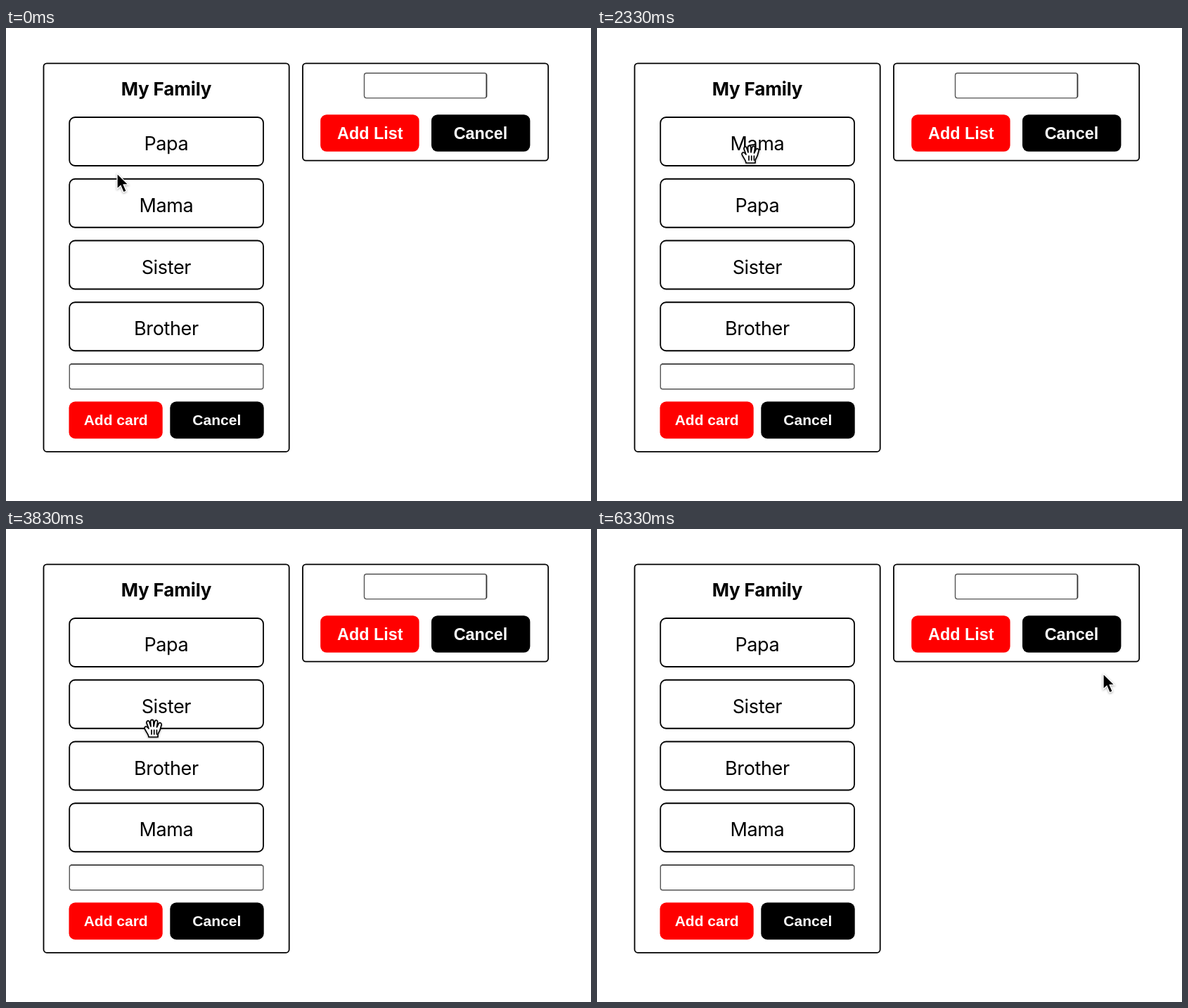
An HTML page that plays this animation: 832 by 673 pixels, repeating every 6.49 s.

```html
<!DOCTYPE html>
<html lang="en">
<head>
<meta charset="utf-8">
<title>Card board</title>
<style>
  html, body { margin: 0; width: 100%; height: 100%; overflow: hidden; background: #fff; }
  svg { display: block; }
  text { text-anchor: middle; }
  .line { fill: none; stroke: #000; stroke-width: 1.8; }
  .field { fill: none; stroke: #555; stroke-width: 1.4; }
  .title { font: 700 26px Inter, sans-serif; letter-spacing: -.15px; }
  .card text { font: 27px Inter, sans-serif; letter-spacing: -.35px; }
  .button { font: 700 21px "Liberation Sans", Arial, sans-serif; fill: #fff; }
  .big { font-size: 23.4px; }
  .hand { fill: #fff; stroke: #000; stroke-width: 1.7; stroke-linejoin: round; stroke-linecap: round; }
  #cursor { filter: drop-shadow(0 1.5px 1.5px rgba(0, 0, 0, .35)); }
</style>
</head>
<body>
<svg width="832" height="673" viewBox="0 0 832 673">
  <rect class="line" x="53.5" y="50.4" width="349.2" height="552.4" rx="4.5"/>
  <text class="title" x="228" y="95.5">My Family</text>
  <rect class="field" x="90.3" y="478.2" width="275.6" height="35.6" rx="3"/>
  <path d="M92 478.2H364" stroke="#333" stroke-width="1.6"/>
  <rect x="89.5" y="531.6" width="133.2" height="52.6" rx="8.8" fill="red"/>
  <rect x="233.3" y="531.6" width="133.4" height="52.6" rx="8.8"/>
  <text class="button" x="156.2" y="565.4">Add card</text>
  <text class="button" x="299.8" y="565.4">Cancel</text>

  <rect class="line" x="422" y="50.4" width="349.2" height="138.2" rx="4.5"/>
  <rect class="field" x="509.5" y="64.2" width="174" height="35.4" rx="3"/>
  <path d="M683.4 66V98" stroke="#333" stroke-width="1.6"/>
  <rect x="447.2" y="123.2" width="140.4" height="52.6" rx="8.8" fill="red"/>
  <rect x="605" y="123.2" width="140.4" height="52.6" rx="8.8"/>
  <text class="button big" x="517.8" y="158">Add List</text>
  <text class="button big" x="675" y="158">Cancel</text>

  <g id="cards"></g>
  <g id="cursor">
    <path id="arrow" d="M0 0V22l5-4.6 4 9.4 4.2-1.8-4-9.2h6.8z" stroke="#fff" stroke-width="1.3"/>
    <g id="open" class="hand">
      <path d="M-6 12C-6 8-12 2-12-1C-11-4-8-3-6 0L-9-8C-9-12-5.5-12-5-9L-3-3L-3.5-10C-3-13.5 .5-13.5 .8-10L1-3L2.5-10C4-13 7-12 6.5-8.5L5.5-2L8-7C10-9.5 12.5-8 12-5C11 0 9.5 4 7 8V12Z"/>
      <path d="M-2 2v6M1.7 2v6M5.4 2v6"/>
    </g>
    <g id="closed" class="hand">
      <path d="M-5 10C-5 7-10 3-10 0C-10-3-7-3-6-2V-6C-5-9-2-9-1-7C0-9.5 3-9.5 4-7C5-8.5 8-8 8-5.5C10-6 10.5-4 10.5-2C10.5 3 7 6 7 10Z"/>
      <path d="M-2 0v6M1.7 0v6M5.4 0v6"/>
    </g>
    <g id="beam" fill="none" stroke-linecap="round">
      <path id="stem" d="M-5-12Q0-12 0-8Q0-12 5-12M0-8V8M-5 12Q0 12 0 8Q0 12 5 12M-2.5 2H2.5" stroke="#fff" stroke-width="4"/>
      <use href="#stem"/>
      <path d="M-5-12Q0-12 0-8Q0-12 5-12M0-8V8M-5 12Q0 12 0 8Q0 12 5 12M-2.5 2H2.5" stroke="#000" stroke-width="1.8"/>
    </g>
  </g>
</svg>
<script>
const LOOP = 6490, LEFT = 90.2, TOP = 127, PITCH = 87.75;
const $ = id => document.getElementById(id);

// Pointer path: [step, x, y, shape]
const pointer = [
  [0, 158, 207, 'arrow'], [1, 157, 171, 'open'], [2, 490, 534, 'arrow'], [3, 490, 534, 'arrow'],
  [4, 546, 430, 'arrow'], [5, 380, 270, 'arrow'], [6, 210, 179, 'open'], [7, 210, 179, 'closed'],
  [8, 208, 205, 'closed'], [10, 204.5, 283, 'closed'], [11, 204.5, 283, 'open'], [14, 218, 180, 'open'],
  [15, 217, 183, 'closed'], [17, 198, 440, 'closed'], [18, 197.5, 486, 'beam'], [19, 198, 500, 'beam'],
  [20, 200, 490, 'beam'], [21, 203, 432, 'open'], [23, 209, 284, 'open'], [24, 220, 265, 'open'],
  [25, 228, 266, 'closed'], [26, 400, 275, 'closed'], [28, 826, 293, 'closed'], [32, 826, 293, 'closed'],
  [33, 817, 289, 'arrow'], [37, 817, 289, 'arrow'], [38, 720, 206, 'arrow']
];

// slots: [step, slot]; drag: grab step, release step, settled step, grip offset
const cards = [
  { name: 'Papa', slots: [[0, 0], [10, 0], [11, 1], [15, 1], [17, 0]],
    drag: { grab: 7, drop: 10, end: 12, dx: 119.5, dy: 51.8 } },
  { name: 'Mama', slots: [[0, 1], [8, 1], [10, 0], [19, 0], [20, 3], [26, 3], [28, 2], [32, 2], [34, 3]],
    drag: { grab: 15, drop: 19, end: 21, dx: 126.5, dy: 56.5 } },
  { name: 'Sister', slots: [[0, 2], [16, 2], [17, 1]],
    drag: { grab: 25, drop: 32, end: 35, dx: 130, dy: 50 } },
  { name: 'Brother', slots: [[0, 3], [17, 3], [19, 2], [26, 2], [28, 1], [32, 1], [34, 2]] }
];

for (const card of cards) {
  $('cards').insertAdjacentHTML('beforeend',
    `<g class="card"><rect class="line" width="275.8" height="69" rx="8"/>
     <text x="137.7" y="47">${card.name}</text></g>`);
  card.el = $('cards').lastElementChild;
}

const mix = (a, b, f) => a + (b - a) * f;

function at(keys, step, field) {
  const i = keys.findLastIndex(k => k[0] <= step);
  const a = keys[i], b = keys[i + 1] || a;
  return mix(a[field], b[field], b === a ? 0 : (step - a[0]) / (b[0] - a[0]));
}

const place = (el, x, y) => el.setAttribute('transform', `translate(${x} ${y})`);

function place_card(card, step) {
  let x = LEFT, y = TOP + PITCH * at(card.slots, step, 1);
  const d = card.drag;
  if (d && step >= d.grab && step < d.end) {
    const held = Math.min(step, d.drop);
    const f = 1 - (1 - (step - held) / (d.end - d.drop)) ** 3;
    x = mix(at(pointer, held, 1) - d.dx, x, f);
    y = mix(at(pointer, held, 2) - d.dy, y, f);
  }
  place(card.el, x, y);
}

// Six steps a second, each starting on a whole 10 ms
function stepAt(t) {
  const k = Math.floor((t + 5) * 6 / 1000);
  return Math.round(k * 50 / 3) * 10 > t ? k - 1 : k;
}

function draw() {
  const step = stepAt(performance.now() % LOOP);
  cards.forEach(card => place_card(card, step));
  place($('cursor'), at(pointer, step, 1), at(pointer, step, 2));
  const shape = pointer.findLast(k => k[0] <= step)[3];
  for (const el of $('cursor').children) el.style.display = el.id === shape ? '' : 'none';
  requestAnimationFrame(draw);
}
draw();
</script>
</body>
</html>
```
